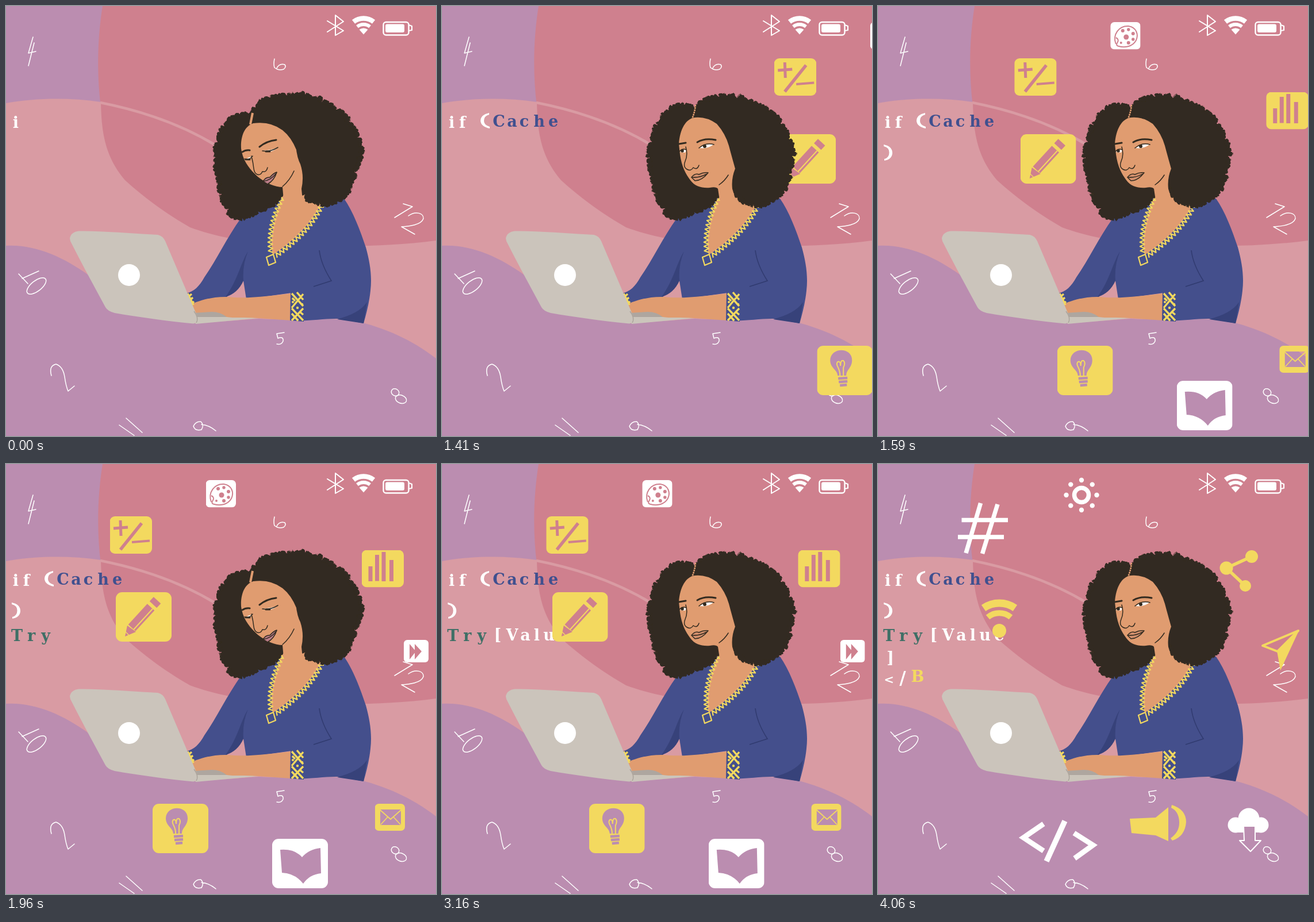
Animation of 748x748 px, one loop 4710 ms. Source, as an HTML page:

```html
<!DOCTYPE html>
<html lang="en">
<head>
<meta charset="utf-8">
<title>Coding at the laptop</title>
<style>
html, body { margin: 0; width: 100%; height: 100%; overflow: hidden; background: #cf808e; }
svg { display: block; width: 100vw; height: 100vh; }
text { font: bold 27px "DejaVu Serif", "Noto Serif", serif; text-anchor: middle; }
.line { fill: none; stroke: #fff; stroke-width: 1.5; stroke-linecap: round; stroke-linejoin: round; }
.ink { fill: none; stroke: #332b20; stroke-width: 1.5; stroke-linecap: round; stroke-linejoin: round; }
.brow { stroke-width: 3; }
.hair { fill: #332b20; stroke: #332b20; stroke-width: 9; stroke-linecap: round; stroke-dasharray: 0 8 0 6 0 10 0 7; filter: url(#curl); }
.trim { fill: none; stroke: #f3d95f; stroke-width: 2.2; stroke-linejoin: round; }
.cuff { stroke-width: 3.4; }
.skin { fill: #e09c70; }
.white { fill: #fff; }
.yellow { fill: #f3d95f; }
.ws { fill: none; stroke: #fff; }
.ys { fill: none; stroke: #f3d95f; }
</style>
</head>
<body>
<svg viewBox="0 0 748 748">
  <filter id="curl" x="-5%" y="-5%" width="110%" height="110%">
    <feTurbulence type="fractalNoise" baseFrequency="0.07" numOctaves="2" seed="4"/>
    <feDisplacementMap in="SourceGraphic" scale="9" xChannelSelector="R" yChannelSelector="G"/>
  </filter>

  <!-- backdrop -->
  <path fill="#cf808e" d="M0 0H748V748H0Z"/>
  <path fill="#bb8db0" d="M0 0H168C160 50 157 110 165 175H0Z"/>
  <path fill="#d99ba3" d="M0 169C50 160 110 159 165 167C166 220 172 262 207 303C250 342 290 368 320 385C360 400 420 414 520 416C600 419 670 418 748 408V748H0Z"/>
  <path d="M164 168C240 183 305 206 366 243" fill="none" stroke="#d99ba3" stroke-width="4.5"/>
  <path fill="#bb8db0" d="M0 417C50 414 100 437 142 467C200 515 255 548 330 552L440 544C500 548 560 541 605 547C660 560 705 580 748 613V748H0Z"/>

  <!-- scattered digits -->
  <g class="line">
    <path d="M47 54L39 82L52 79M49 64L39 104"/>
    <path d="M467 92Q465 101 467 107Q474 113 483 110Q488 106 485 102Q476 99 471 108"/>
    <path d="M691 344L707 349L676 368M700 365C712 356 727 360 726 370C722 381 702 383 688 384L711 397"/>
    <path d="M22 466L38 483M28 474L57 461"/>
    <ellipse cx="53" cy="487" rx="20" ry="9" transform="rotate(-38 53 487)"/>
    <path d="M484 568L471 570L473 578Q483 574 482 583Q479 590 471 588"/>
    <path d="M79 643Q74 626 87 623Q99 627 102 645Q104 660 108 670L119 661"/>
    <ellipse cx="677" cy="672" rx="7" ry="6" transform="rotate(30 677 672)"/>
    <ellipse cx="687" cy="684" rx="10" ry="7" transform="rotate(20 687 684)"/>
    <path d="M197 729L223 747M209 717L237 742"/>
    <path d="M340 737Q329 740 326 731Q330 722 339 723Q345 729 340 737M340 728Q353 729 365 739"/>
  </g>

  <g id="code"></g>
  <g id="apps"></g>

  <g id="tools">
    <path class="ws" stroke-width="7.5" d="M178.5 68L153 155M208 70L181.5 156M145.5 97.5H226M139 127H219"/>
    <circle class="ws" cx="354" cy="54" r="12.5" stroke-width="7.5"/>
    <g id="rays" class="white"></g>
    <path class="ys" stroke-width="5.5" d="M650 161L606 181L639 212"/>
    <g class="yellow"><circle cx="606" cy="181" r="11.5"/><circle cx="650" cy="161" r="11"/><circle cx="639" cy="212" r="10"/></g>
    <path class="ys" stroke-width="13" d="M183.6 250.7A48 48 0 0 1 238.4 250.7"/>
    <path class="ys" stroke-width="10" d="M191 266.5A31 31 0 0 1 231 266.5"/>
    <circle class="yellow" cx="211" cy="290" r="12"/>
    <path class="ys" stroke-width="4" stroke-linejoin="round" d="M731 290L669 316L695 326Z"/>
    <path class="yellow" d="M733 288L694 325L700 359Z"/>
    <path class="ws" stroke-width="9" d="M288 626L253 650L288 673M341 642L374 663L342 686"/>
    <path class="ws" stroke-width="9.5" d="M325 621L293 691"/>
    <path class="yellow" d="M438 617L483 615L505 597V656L483 646L441 642ZM511 593Q536 601 536 623Q534 648 512 655L509 651Q525 640 524 622Q523 604 510 598Z"/>
    <g class="white">
      <circle cx="622" cy="628" r="13.5"/><circle cx="645" cy="617" r="18.5"/><circle cx="666" cy="628" r="13.5"/>
      <rect x="622" y="622" width="44" height="19"/>
    </g>
    <path fill="#bb8db0" stroke="#fff" stroke-width="2" stroke-linejoin="round" d="M636 630H656V655H666L648 674L629 655H637Z"/>
  </g>

  <!-- status bar -->
  <path class="ws" stroke-width="2" stroke-linejoin="round" stroke-linecap="round" d="M559 26L587 43L573 51V16L587 27L559 45"/>
  <path class="ws" stroke-width="8.5" d="M604.5 27.5A28.5 28.5 0 0 1 639.5 27.5"/>
  <path class="ws" stroke-width="6" d="M611 36A17.5 17.5 0 0 1 633 36"/>
  <path class="white" d="M622 49.5L614.5 41Q622 36 629.5 41Z"/>
  <rect class="ws" stroke-width="2.4" x="656.5" y="28" width="44" height="22.5" rx="4.5"/>
  <rect class="white" x="660" y="31.5" width="33" height="14.5" rx="3"/>
  <path class="ws" stroke-width="2.2" stroke-linejoin="round" d="M701 33L706 35V42L701 43"/>

  <!-- body -->
  <path fill="#444f8c" d="M408 370C386 400 366 442 345 472C336 488 327 497 313 500L326 522L384 506L413 478L418 510L497 499L494 546C520 550 550 543 580 544L622 552C627 535 632 515 634 495C637 470 633 445 626 420C616 390 604 358 588 335L490 325Z"/>
  <path fill="#37427a" d="M421 427C408 447 404 475 382 506Q403 500 413 478Q411 450 421 427ZM576 545C600 538 618 530 628 515L622 552Z"/>
  <path fill="none" stroke="#313b70" stroke-width="1.6" d="M545 425Q548 450 566 478L535 488"/>
  <path class="skin" d="M484 322H516L549 343Q525 392 464 433Q455 395 484 322Z"/>
  <path class="trim zig" d="M481 333C465 365 456 395 461 431"/>
  <path class="trim zig" d="M550 345C533 385 500 412 469 435"/>
  <path class="trim" d="M453 437L465 432L469 446L457 451Z"/>

  <!-- arm and laptop -->
  <path fill="#cbc5bb" d="M325 540H405L440 543L330 553Z"/>
  <path fill="#aea69f" d="M328 531H368L390 541H330Z"/>
  <path class="skin" d="M318 521C335 512 360 505 386 506C420 510 460 504 496 500V547L440 543C415 541 395 543 384 541Q373 532 358 532L326 534Z"/>
  <path fill="#444f8c" d="M495 497L518 498V549L494 547Z"/>
  <g class="trim cuff">
    <path d="M497 500L517 522M517 501L497 525M497 526L517 547M517 526L497 547M506 498L517 511M497 535L508 547M498 508L503 513M511 532L517 537"/>
    <path d="M316 500L326 520M323 501L317 506M325 507L319 513M327 514L322 519"/>
  </g>
  <g class="yellow"><circle cx="499" cy="515" r="2"/><circle cx="515" cy="519" r="2.2"/><circle cx="507" cy="525" r="2.2"/><circle cx="507" cy="546" r="2"/></g>
  <path fill="#cbc4bb" d="M111 404Q113 393 127 391.5C170 391 220 396 264 398Q273 400 277 409L332 538Q335 551 326 552.5C280 548 230 541 189 534Q177 531 173 524C152 485 130 445 112 409Z"/>
  <path fill="none" stroke="#aaa299" stroke-width="1.3" d="M327 531Q336 543 331 551"/>
  <circle class="white" cx="214" cy="468" r="19"/>

  <!-- head raised -->
  <g id="up">
    <path class="hair" data-blob="440,179 426,172 409,173 391,184 375,207 363,234 360,264 363,292 371,322 381,347 404,369 428,364 452,354 472,341 484,326 492,300 506,320 518,336 545,346 572,341 589,328 602,306 607,278 611,254 598,217 584,193 558,175 526,162 492,156 460,162 448,170"/>
    <path class="skin" d="M440 194C424 196 414 214 412 240L414 258C417 280 424 292 432 303C440 314 452 317 466 316Q477 314 480 318L483 338L511 338L505 318Q503 300 510 283Q504 262 499 243Q493 222 478 205Q460 192 440 194Z"/>
    <path d="M441 172Q440 184 435 196" fill="none" stroke="#e09c70" stroke-width="2.5" stroke-dasharray="3 1"/>
    <path class="white" d="M414 254Q418 248 425 251L423 255ZM448 247Q459 238 472 241Q462 249 448 247Z"/>
    <circle cx="418" cy="252" r="2.8" fill="#332b20"/><circle cx="457" cy="244" r="3" fill="#332b20"/>
    <path fill="#d3906d" d="M434 298Q440 290 447 293Q455 289 463 292Q452 304 440 304Z"/>
    <path class="ink" d="M413 253Q418 247 425 250M447 247Q459 237 473 241M424 245Q428 260 423 270Q419 280 426 284Q433 288 437 281Q444 286 447 277M434 298Q440 290 447 293Q455 289 463 290Q452 304 440 304ZM436 298Q448 299 461 292M482 311Q492 304 498 294"/>
    <path class="ink brow" d="M412 240L424 238M444 237Q457 229 476 233"/>
  </g>

  <!-- head lowered -->
  <g id="down">
    <path class="hair" data-blob="424,190 408,188 388,199 371,222 364,255 366,290 373,325 382,349 403,369 430,363 456,349 475,337 482,324 495,300 514,322 528,338 555,344 580,339 596,322 604,300 610,280 618,256 610,222 588,189 560,170 530,157 498,155 470,157 446,165 431,180"/>
    <path class="skin" d="M430 204C413 210 408 230 409 248C412 270 424 284 438 297C452 308 468 315 481 315L483 338L516 338L514 318Q519 296 512 275Q507 266 505 250Q496 228 481 216Q460 200 430 204Z"/>
    <path d="M429 186L425 206" fill="none" stroke="#e09c70" stroke-width="4"/>
    <path class="white" d="M416 268Q422 270 428 262L421 264ZM448 252Q460 257 472 247L460 250Z"/>
    <path fill="#bb7d88" d="M447 305Q452 297 459 298Q465 291 471 289Q467 303 455 310Z"/>
    <path class="ink" d="M415 266Q423 269 429 261M446 252Q460 254 473 246M427 261Q430 273 431 283Q432 291 437 293Q443 295 446 288Q453 290 455 281M447 305Q452 297 459 298Q465 291 471 289Q467 303 455 310ZM447 305Q460 304 471 290M481 314Q494 303 501 287"/>
    <path class="ink brow" d="M411 254Q417 250 424 251M441 245Q453 235 470 233M417 267L424 267M452 253L459 253"/>
  </g>
</svg>

<script>
const LOOP = 4710;
const $ = id => document.getElementById(id);

// closed smooth curve through points
function blob(pts) {
  const n = pts.length, at = i => pts[(i + n) % n];
  let d = 'M' + pts[0];
  for (let i = 0; i < n; i++) {
    const [a, b, c, e] = [at(i - 1), at(i), at(i + 1), at(i + 2)];
    d += `C${b.map((v, k) => v + (c[k] - a[k]) / 6)} ${c.map((v, k) => v - (e[k] - b[k]) / 6)} ${c}`;
  }
  return d + 'Z';
}
document.querySelectorAll('[data-blob]').forEach(p =>
  p.setAttribute('d', blob(p.dataset.blob.split(' ').map(s => s.split(',').map(Number)))));

// turn a guide path into a zigzag
document.querySelectorAll('.zig').forEach(p => {
  const len = p.getTotalLength(), pts = [];
  for (let s = 0, side = 3.9; s < len; s += 3.7, side = -side) {
    const a = p.getPointAtLength(s), b = p.getPointAtLength(s + 1), c = p.getPointAtLength(s - 1);
    const dx = b.x - c.x, dy = b.y - c.y, m = Math.hypot(dx, dy) || 1;
    pts.push([a.x - dy / m * side, a.y + dx / m * side]);
  }
  p.setAttribute('d', 'M' + pts.join('L'));
});

for (let i = 0; i < 8; i++) {
  const a = i * Math.PI / 4;
  $('rays').innerHTML += `<circle cx="${354 + 26.5 * Math.sin(a)}" cy="${54 - 26 * Math.cos(a)}" r="4.2"/>`;
}

// typed code: glyph, centre x, baseline, time, colour, size
const W = '#fff', B = '#40508f', G = '#3f6f66', Y = '#f3d95f';
const glyphs = [
  ['i', 17, 212, 0, W], ['f', 35.5, 212, 150, W],
  ['C', 99, 209.5, 470, B], ['a', 122, 209.5, 640, B], ['c', 143, 209.5, 810, B],
  ['h', 169, 209.5, 980, B], ['e', 193.5, 209.5, 1150, B],
  ['T', 19, 308, 1620, G], ['r', 44, 308, 1790, G], ['y', 69, 308, 1960, G],
  ['[', 97, 306, 2410, W], ['V', 122, 306.5, 2710, W], ['a', 145, 306.5, 2860, W],
  ['l', 165, 306.5, 3010, W], ['u', 186, 306.5, 3160, W], ['e', 211, 306.5, 3310, W],
  [']', 21.5, 346, 3460, W], ['&lt;', 19, 382, 3610, W, 21], ['/', 43, 383, 3760, W, 31], ['B', 69, 378.5, 3910, Y]
];
const parens = [
  ['M82 186Q67 189 67 200Q68 210 83 213V210Q73 207 73 200Q73 191 82 189Z', 300],
  ['M10 241Q25 244 25 256Q24 267 11 269V266Q19.5 264 19.5 255Q19.5 246 10 244Z', 1470]
];
$('code').innerHTML =
  glyphs.map(([c, x, y, t, f, size = 27]) =>
    `<text x="${x}" y="${y}" fill="${f}" style="font-size:${size}px" data-at="${t}">${c}</text>`).join('') +
  parens.map(([d, t]) => `<path class="white" d="${d}" data-at="${t}"/>`).join('');
const typed = [...$('code').children];

// app tiles whose symbols are cut out
const dot = (x, y, r) => `<circle cx="${x}" cy="${y}" r="${r}"/>`;
const cut = (d, w) => `<path d="${d}" fill="none" stroke="#000" stroke-width="${w}"/>`;
const keep = (d, w) => `<path d="${d}" fill="none" stroke="#fff" stroke-width="${w}"/>`;
const hole = d => `<path d="${d}"/>`;
const tiles = [
  [347.5, 28, 52.5, 47.5, 7, W,
    cut('M357 66C351 50 362 34 379 35C393 37 397 50 392 60C386 71 372 73 362 70Q356 69 360 63Q363 58 357 55', 2) +
    dot(369, 43, 3) + dot(379, 41, 2.7) + dot(387, 48, 3) + dot(387, 58, 2.7) + dot(379, 64, 3) + dot(375, 54, 4.5) + dot(366, 64, 2)],
  [180.5, 91, 73.5, 65, 9, Y,
    cut('M187 112L212 110M199 98L200 125', 5) + cut('M236 103L199 149', 5.5) + cut('M219 136L250 133.5', 3.8)],
  [191, 223, 97, 86, 11, Y,
    cut('M219 285L252 249', 17) + keep('M222 288L255 252', 2) +
    cut('M256 244.5L263 237', 17) + hole('M211 281L207 300L226 292Z') + keep('M207 291L215 299', 1.5)],
  [618.5, 149.5, 73.5, 65, 9, Y,
    hole('M630.5 178H637.5V204H630.5ZM642 158H649V203.5H642ZM653.5 153H660.5V204H653.5ZM667 167H674V204H667Z')],
  [692, 306, 43, 39, 6, W, hole('M702 313L713 326L702 340ZM711 313L723 326L711 340Z')],
  [255, 591, 97, 86, 11, Y,
    hole('M291 643C290 632 278 630 278 616C279 593 316 593 316 616C316 630 306 632 306 643Z') +
    cut('M292 648L308 647M293 654L308 653M295 660L307 659', 4.5) +
    keep('M295 643C296 630 286 625 291 619Q296 617 296 626Q296 615 301 617Q305 621 301 629L301 643', 2)],
  [641.5, 591, 52.5, 47, 7, Y,
    hole('M653 601H685Q687 601 687 603V626Q687 628 685 628H653Q651 628 651 626V603Q651 601 653 601Z') +
    keep('M651 602L669 618L687 602M652 627L664 614M686 627L674 614', 1.7)],
  [463, 652, 97, 86, 11, W,
    hole('M477 671Q502 669 515 684Q527 670 547 668L548 712Q528 714 517 730Q503 712 480 711Z')]
];
$('apps').innerHTML = tiles.map(([x, y, w, h, r, f, art], i) => {
  const box = `x="${x}" y="${y}" width="${w}" height="${h}"`;
  return `<mask id="m${i}" maskUnits="userSpaceOnUse" ${box}><rect ${box} fill="#fff"/>${art}</mask>` +
    `<rect ${box} rx="${r}" fill="${f}" mask="url(#m${i})"/>`;
}).join('');

const show = (el, on) => el.style.display = on ? '' : 'none';
const within = (t, a, b) => t >= a && t < b;

function draw() {
  const t = performance.now() % LOOP;
  typed.forEach(el => show(el, t >= +el.dataset.at));

  const low = t < 300 || within(t, 1960, 2410);
  show($('down'), low);
  show($('up'), !low);

  // tiles glide in at constant speed, one step per 30 ms
  const left = Math.max(0, Math.ceil((1620 - t) / 30));
  const x = t >= 3160 ? 0.8 : left * 56.75;
  $('apps').setAttribute('transform', `translate(${x})`);
  show($('apps'), within(t, 1290, 2260) || within(t, 3160, 4060));
  show($('tools'), within(t, 2260, 3160) || t >= 4060);
  requestAnimationFrame(draw);
}
draw();
</script>
</body>
</html>
```
